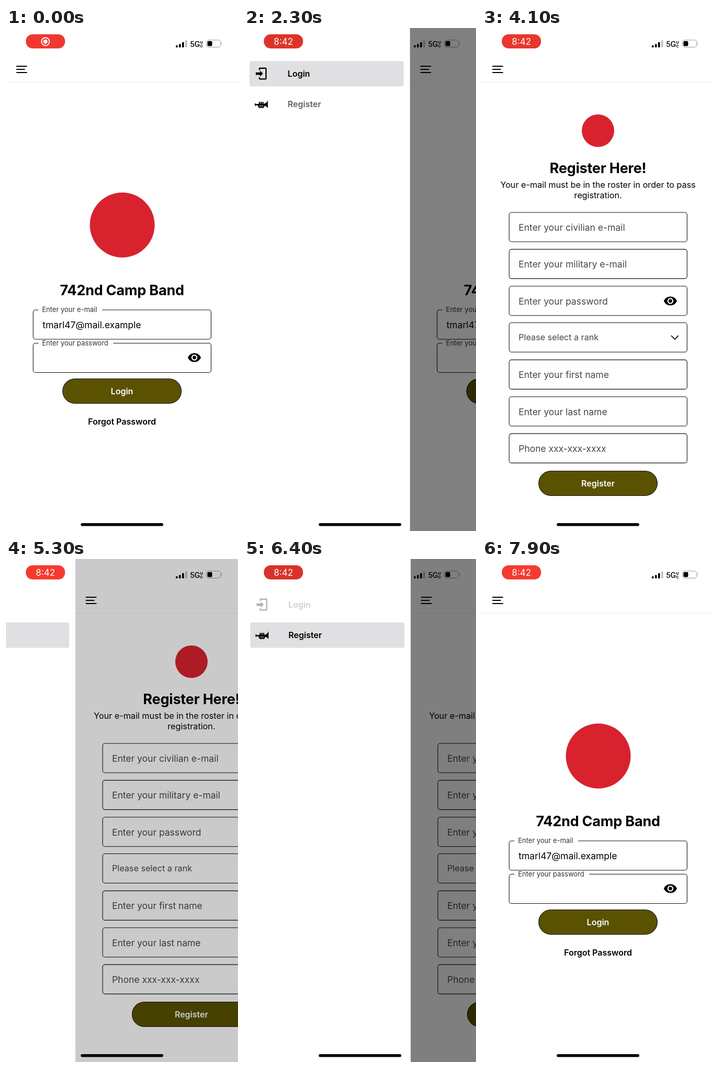
An HTML page for the animation above (8000 ms loop, 444x960 px).

```html
<!DOCTYPE html>
<html lang="en">
<head>
<meta charset="utf-8">
<title>Login and register drawer</title>
<style>
  html, body { margin: 0; width: 100%; height: 100%; overflow: hidden; background: #fff; }
  svg { display: block; width: 444px; height: 960px; font-family: Inter, "Open Sans", sans-serif; }
  .title { font-size: 27px; font-weight: 700; letter-spacing: -.2px; }
  .bold { font-size: 16px; font-weight: 600; }
  .mid { text-anchor: middle; }
  .field { font-size: 17.5px; }
  .hint { fill: #49454f; }
  .note { font-size: 16.2px; }
  .label { font-size: 13px; fill: #333; }
  .box { fill: none; stroke: #111; stroke-width: 1.1; }
  .button { fill: #5a5200; stroke: #111; stroke-width: 1.1; }
  .line { fill: none; stroke: #000; stroke-width: 2; }
  .emblem { fill: #d8232f; }
</style>
</head>
<body>
<svg viewBox="0 0 444 960">
  <defs>
    <g id="eye">
      <path d="M-12.5 0C-10.5-5-5.7-8.5 0-8.5S10.5-5 12.5 0C10.5 5 5.7 8.5 0 8.5S-10.5 5-12.5 0z"/>
      <circle r="5.7" fill="#fff"/><circle r="3.4"/>
    </g>
  </defs>

  <g id="drawer">
    <rect width="319" height="960" fill="#fff"/>
    <rect id="active" x="12" width="295" height="48.5" rx="4" fill="#e0dfe2"/>
    <g id="loginItem">
      <path transform="translate(20.5 73.3) scale(1.15)" d="M10 17V14H3V10H10V7L15 12L10 17M10 2H19A2 2 0 0 1 21 4V20A2 2 0 0 1 19 22H10A2 2 0 0 1 8 20V18H10V20H19V4H10V6H8V4A2 2 0 0 1 10 2"/>
      <text class="bold" x="85" y="93">Login</text>
    </g>
    <g id="registerItem">
      <path d="M22 144h2v1h13q7 0 10-7v15q-3-5-10-5.500H24v1h-2z"/>
      <rect class="line" x="28.500" y="145" width="11.500" height="6" rx="3" style="stroke-width:1.500"/>
      <path class="line" d="M31 142v11M34.300 142v11M37.600 142v11M29.800 142h2.400M33.100 142h2.400M36.400 142h2.400"/>
      <text class="bold" x="85" y="151">Register</text>
    </g>
  </g>

  <g id="page">
    <rect width="444" height="960" fill="#fff"/>
    <path d="M0 103.500H444" stroke="#ececec"/>
    <path class="line" stroke-linecap="round" d="M20.500 73H39.500M20.500 79H35.500M20.500 85H39.500"/>

    <g id="loginPage">
      <circle class="emblem" cx="222.500" cy="376" r="62"/>
      <text class="title mid" x="222" y="510">742nd Camp Band</text>
      <rect class="box" x="52" y="538" width="340.500" height="56" rx="4.500"/>
      <rect class="box" x="52" y="601.500" width="340.500" height="56" rx="4.500"/>
      <path d="M62 538H184M62 601.500H205" stroke="#fff" stroke-width="4"/>
      <text class="label" x="69" y="542">Enter your e-mail</text>
      <text class="label" x="69" y="606">Enter your password</text>
      <text class="field" x="70" y="573">tmarl47@mail.example</text>
      <use href="#eye" x="360.500" y="629"/>
      <rect class="button" x="108.500" y="669.500" width="227" height="47" rx="23.500"/>
      <text class="bold mid" x="222" y="699" fill="#fff">Login</text>
      <text class="bold mid" x="222" y="757">Forgot Password</text>
    </g>

    <g id="registerPage">
      <circle class="emblem" cx="222" cy="196" r="31"/>
      <text class="title mid" x="222" y="277">Register Here!</text>
      <text class="note mid" x="222" y="305">Your e-mail must be in the roster in order to pass</text>
      <text class="note mid" x="222" y="325">registration.</text>
      <g id="fields"></g>
      <use href="#eye" x="360.500" y="521"/>
      <path class="line" d="M362 587l7 7 7-7" style="stroke-width:1.700"/>
      <rect class="button" x="108.500" y="845.500" width="227" height="47" rx="23.500"/>
      <text class="bold mid" x="222" y="875" fill="#fff">Register</text>
    </g>
    <rect id="shade" width="444" height="960"/>
  </g>

  <rect id="pill" x="38" y="12" width="75" height="27" rx="13"/>
  <g id="record">
    <circle cx="75.500" cy="26" r="7.500" fill="none" stroke="#fff" stroke-width="1.900"/>
    <circle cx="75.500" cy="26" r="4" fill="#fff"/>
  </g>
  <text id="clock" class="mid" x="75.500" y="32" font-size="17" fill="#fff">8:42</text>

  <rect x="325" y="33" width="3.600" height="4" rx="1"/>
  <rect x="331" y="30.500" width="3.600" height="6.500" rx="1"/>
  <rect id="bar" x="337" y="27" width="3.600" height="10" rx="1"/>
  <rect x="343" y="23.500" width="3.600" height="13.500" rx="1" opacity=".25"/>
  <g font-family="Roboto, sans-serif">
    <text x="352" y="36" font-size="15.500" stroke="#000" stroke-width=".2">5G</text>
    <g font-size="8" font-weight="700"><text x="371.500" y="29.500">U</text><text x="371.500" y="37">C</text></g>
  </g>
  <rect x="383.500" y="23" width="27.500" height="13.500" rx="4.500" fill="none" stroke="#000" stroke-opacity=".4"/>
  <rect x="385.500" y="25" width="9" height="9.500" rx="2"/>
  <path d="M412.300 27.500q2 2.200 0 4.500z" opacity=".45"/>
  <rect x="143" y="945" width="158" height="5.500" rx="2.750"/>
</svg>

<script>
const $ = id => document.getElementById(id);
const LOOP = 8000, WIDTH = 319;
const moves = [[-9000, 0], [1523, 1], [2618, 0], [5224, 1], [6500, 0]];
const toRegister = moves[2][0], toLogin = moves[4][0];

const hints = ["Enter your civilian e-mail", "Enter your military e-mail", "Enter your password",
  "Please select a rank", "Enter your first name", "Enter your last name", "Phone xxx-xxx-xxxx"];
$("fields").innerHTML = hints.map((hint, i) => {
  const select = i === 3, y = 352 + i * 70.35 - (select ? .6 : 0);
  return `<rect class="box" x="52" y="${y}" width="340.5" height="56" rx="4.5"/>
    <text class="${select ? "note" : "field"} hint" x="70" y="${y + (select ? 33.5 : 35)}">${hint}</text>`;
}).join("");

// The drawer eases exponentially towards its latest target.
function openness(t) {
  const [start, target] = moves.filter(m => m[0] <= t).pop();
  let rest = Math.exp(-.007 * (t - start));
  if (rest < .003) rest = 0;
  return target ? 1 - rest : rest;
}

// A pressed item dims at once and fades back after release.
function pressOpacity(t, release) {
  if (t < release - 120) return 1;
  return Math.min(1, .3 + .7 * Math.max(0, t - release) / 200);
}

const show = (id, on) => $(id).setAttribute("display", on ? "inline" : "none");

function draw(t) {
  const open = openness(t), x = open * WIDTH;
  const registering = t >= toRegister && t < toLogin;

  $("drawer").setAttribute("transform", `translate(${x - WIDTH})`);
  $("page").setAttribute("transform", `translate(${x})`);
  $("shade").setAttribute("opacity", open / 2);
  show("loginPage", !registering);
  show("registerPage", registering);

  $("active").setAttribute("y", registering ? 121 : 63);
  $("loginItem").lastElementChild.setAttribute("fill", registering ? "#646267" : "#000");
  $("registerItem").lastElementChild.setAttribute("fill", registering ? "#000" : "#646267");
  $("loginItem").setAttribute("opacity", pressOpacity(t, toLogin));
  $("registerItem").setAttribute("opacity", pressOpacity(t, toRegister));

  const glow = .915 + .085 * Math.cos((t - 1600) / 1000 * Math.PI);
  $("pill").setAttribute("fill", `rgb(${[255, 60, 49].map(c => Math.round(c * glow))})`);
  show("record", t < 2300);
  show("clock", t >= 2300);
  $("bar").setAttribute("opacity", t > 1000 && t < 2300 ? .25 : 1);
}

function tick() {
  draw(performance.now() % LOOP);
  requestAnimationFrame(tick);
}
tick();
</script>
</body>
</html>
```
